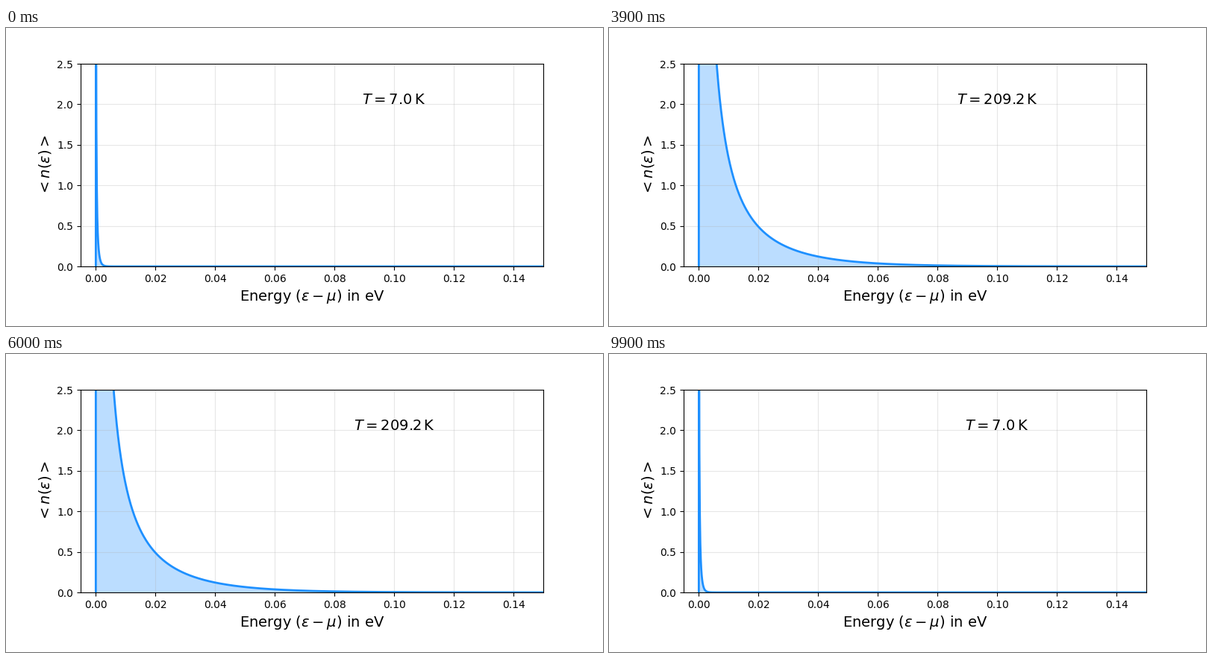
Animation of 800 by 400 pixels, one loop 10 s. Source, as a matplotlib script:

```python
import numpy as np
import matplotlib.pyplot as plt
from matplotlib.animation import FuncAnimation

K_B = 8.617333e-5  # Boltzmann constant in eV/K
BLUE = "dodgerblue"

rise = np.geomspace(7, 500, 50)
temps = np.concatenate([rise, rise[::-1]])
energy = np.linspace(-0.005, 0.15, 1000)


def bose(e, temp):
    return 1 / np.expm1(e / (K_B * temp))


plt.rcParams["font.family"] = "DejaVu Sans"
fig, ax = plt.subplots(figsize=(8, 4), dpi=100)
fig.subplots_adjust(left=0.125, right=0.9, bottom=0.2, top=0.88)

ax.set_xlim(-0.005, 0.15)
ax.set_ylim(0, 2.5)
ax.set_xticks(np.arange(0, 0.15, 0.02))
ax.grid(alpha=0.3)
ax.set_xlabel(r"Energy $(\varepsilon - \mu)$ in eV", fontsize=14)
ax.set_ylabel(r"$<n(\varepsilon)>$", fontsize=14)

curve, = ax.plot([], [], color=BLUE, lw=2)
label = ax.text(0.1, 2.0, "", fontsize=14, ha="center")
fill = None


def update(i):
    global fill
    temp = temps[i]
    n = bose(energy, temp)
    curve.set_data(energy, n)
    if fill is not None:
        fill.remove()
    fill = ax.fill_between(energy, n, 0, color=BLUE, alpha=0.3, lw=0)
    label.set_text(rf"$T = {temp:.1f}\,\mathrm{{K}}$")
    return curve, fill, label


anim = FuncAnimation(fig, update, frames=len(temps), interval=100,
                     init_func=lambda: update(0), repeat=True, repeat_delay=0)
plt.show()
```
